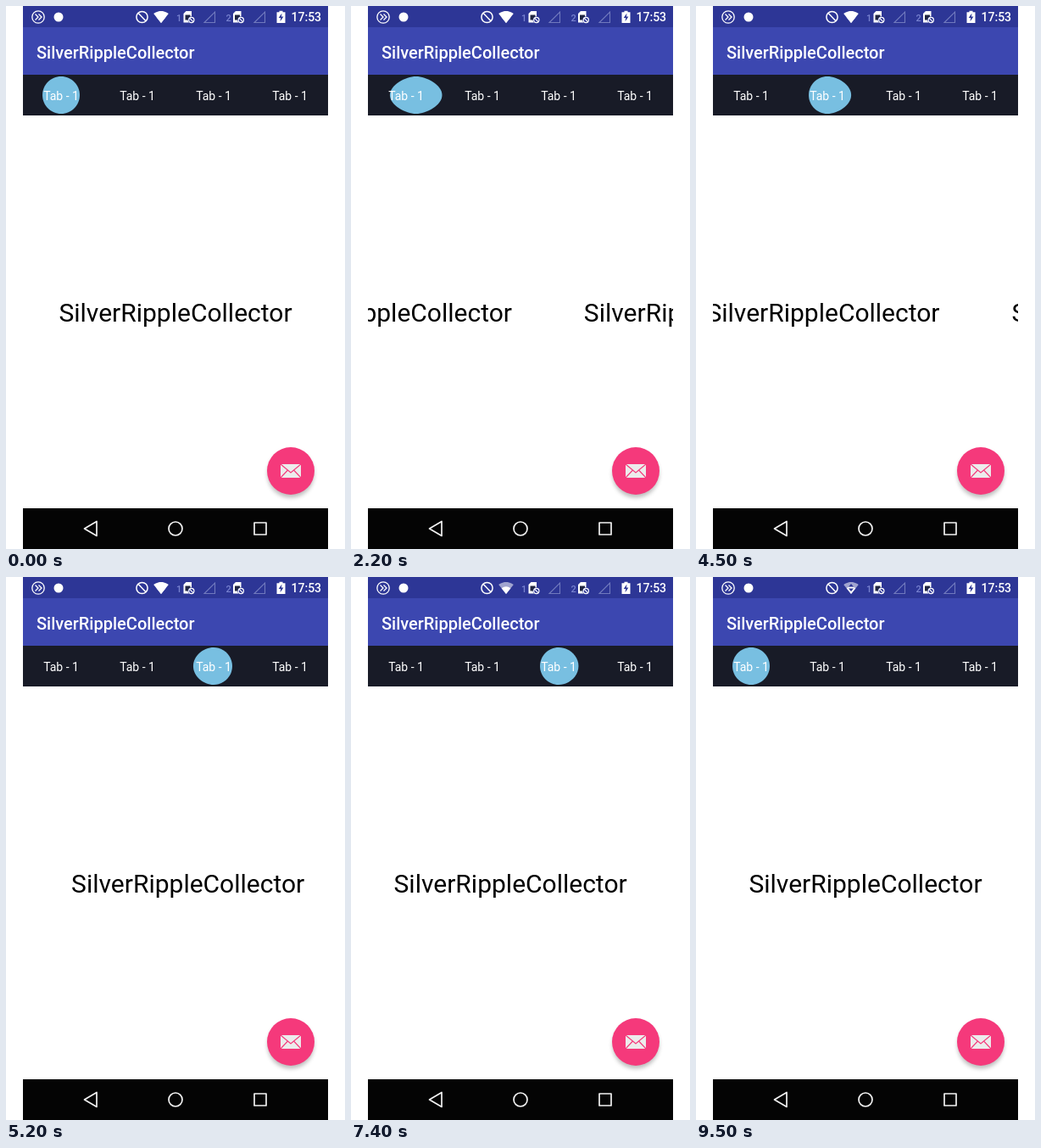
Animation of 400x640 px, one loop 10000 ms. Source, as an HTML page:

```html
<!DOCTYPE html>
<html lang="en">
<head>
<meta charset="utf-8">
<title>Tab indicator</title>
<style>
  html, body { margin: 0; width: 100%; height: 100%; overflow: hidden; background: #fff; }
  svg { display: block; width: 100%; height: 100%; font-family: Roboto, "Noto Sans", sans-serif; }
</style>
</head>
<body>
<svg viewBox="0 0 400 640">
  <defs>
    <clipPath id="screen"><rect x="20" y="0" width="360" height="640"/></clipPath>
    <filter id="soft" x="-30%" y="-30%" width="160%" height="160%"><feGaussianBlur stdDeviation="2.6"/></filter>
    <g id="sim">
      <path d="M0 3 L3 0 H9.5 V13.5 H0 Z" fill="#fff"/>
      <path d="M2 4.5 H8 V10.5 H2 Z" fill="#20253f"/>
      <circle cx="9.3" cy="10.5" r="4.2" fill="#2d3696"/>
      <circle cx="9.3" cy="10.5" r="3.1" fill="none" stroke="#fff" stroke-width="1.2"/>
      <path d="M7.2 8.4 L11.4 12.6" stroke="#fff" stroke-width="1.2"/>
    </g>
    <path id="signal" d="M0 12.5 L12.5 0 V12.5 Z" fill="none" stroke="#7079bd" stroke-width="1.1"/>
  </defs>
  <g clip-path="url(#screen)">
    <rect x="20" y="0" width="360" height="25" fill="#2d3696"/>
    <rect x="20" y="25" width="360" height="56" fill="#3c47b0"/>
    <rect x="20" y="81" width="360" height="48" fill="#181b27"/>
    <rect x="20" y="592" width="360" height="48" fill="#040404"/>

    <g fill="none" stroke="#fff" stroke-width="1.3">
      <circle cx="38" cy="13" r="7.2"/>
      <path d="M34.5 9.5 L38 13 L34.5 16.5 M38.5 9.5 L42 13 L38.5 16.5"/>
      <circle cx="160.5" cy="13" r="6.6" stroke-width="1.5"/>
      <path d="M156 8.3 L165 17.7" stroke-width="1.5"/>
    </g>
    <circle cx="62" cy="13" r="5.5" fill="#fff"/>
    <path id="wifi" d="M183 20 L191.8 9 C191.5 8.8 188.1 6 183 6 S174.5 8.8 174.2 9 Z" fill="#fff"/>
    <path d="M183 20 L188.4 13.2 Q183 9.4 177.6 13.2 Z" fill="#fff"/>
    <path id="arrows" d="M180 11.5 L183 8 L186 11.5 Z M180 13.5 H186 L183 17 Z" fill="#2d3696"/>
    <g font-size="11" font-weight="500" fill="#7983d0">
      <text x="201" y="18">1</text><text x="259.5" y="18">2</text>
    </g>
    <use href="#sim" x="209.5" y="6"/><use href="#sim" x="268" y="6"/>
    <use href="#signal" x="234" y="7"/><use href="#signal" x="293" y="7"/>
    <path d="M319.5 7.3 H322.5 V5.8 H326.5 V7.3 H329.5 V20 H319.5 Z" fill="#fff"/>
    <path d="M325.5 8.5 L321.7 14 H324.2 L323.5 18.3 L327.4 12.6 H324.9 Z" fill="#2d3696"/>
    <text x="336.5" y="18" font-size="14" font-weight="500" fill="#fff">17:53</text>

    <text x="36" y="61.5" font-size="20" font-weight="500" fill="#fff">SilverRippleCollector</text>
    <path id="blob" fill="#78bfe1"/>
    <g id="tabs" font-size="14" fill="#fff" text-anchor="middle"></g>
    <g id="pages" font-size="30" fill="#000" text-anchor="middle"></g>

    <circle cx="336" cy="552" r="27.5" fill="#000" opacity=".26" filter="url(#soft)"/>
    <circle cx="336" cy="548" r="28" fill="#f5397b"/>
    <rect x="324" y="540" width="24" height="16" fill="#ececec"/>
    <path d="M324 540 L336 550 L348 540 M324 556 L332.5 547 M348 556 L339.5 547" fill="none" stroke="#f5397b" stroke-width="1.1"/>

    <g fill="none" stroke="#f2f2f2" stroke-width="1.7" stroke-linejoin="round">
      <path d="M92.5 616 L107 607.5 V624.5 Z"/>
      <circle cx="200" cy="616" r="8"/>
      <rect x="293" y="609" width="14" height="14"/>
    </g>
  </g>
</svg>
<script>
  const LOOP = 10000, STEP = 100;
  const PAGE = 360, TAB = 90, FIRST = 65, CY = 105, R = 22;
  const STRETCH = 17.6, HANDLE = R * .5523;
  const $ = id => document.getElementById(id);
  const ramp = (x, a, b) => Math.min(1, Math.max(0, (x - a) / (b - a)));

  // [time in ms, page position]
  const swipes = [
    [0, 0], [1400, 0], [2000, .46], [2200, .41], [2600, .06], [3100, 0],
    [3200, 0], [3500, .314], [3800, .76], [4200, .985], [4350, 1],
    [4500, 1.139], [4800, 1.62], [5100, 1.93], [5400, 2],
    [5600, 2.06], [6000, 2.656], [6300, 2.95], [6550, 3],
    [6800, 2.88], [7000, 2.5], [7200, 2.14], [7400, 2.033], [7600, 2],
    [7700, 1.96], [8000, 1.5], [8300, 1.1], [8600, 1],
    [8700, .98], [9000, .55], [9300, .08], [9500, 0], [LOOP, 0]
  ];

  const slope = i => (swipes[i + 1][1] - swipes[i][1]) / (swipes[i + 1][0] - swipes[i][0]);

  // Harmonic mean of neighbouring slopes keeps the curve monotone
  function tangent(i) {
    if (i === 0 || i === swipes.length - 1) return 0;
    const a = slope(i - 1), b = slope(i);
    return a * b > 0 ? 2 * a * b / (a + b) : 0;
  }

  function position(t) {
    let i = 0;
    while (i < swipes.length - 2 && t >= swipes[i + 1][0]) i++;
    const [t0, p0] = swipes[i], [t1, p1] = swipes[i + 1];
    const d = t1 - t0, u = (t - t0) / d, v = 1 - u;
    return p0 * v * v * (1 + 2 * u) + p1 * u * u * (3 - 2 * u)
      + d * u * v * (tangent(i) * v - tangent(i + 1) * u);
  }

  // Front edge reaches out, the body jumps across, the rear edge follows
  function blobPath(pos) {
    const tab = Math.min(2, Math.floor(pos)), p = pos - tab;
    const shift = (TAB - STRETCH) * ramp(p, .4, .65);
    const base = FIRST + tab * TAB - R;
    const left = base + shift + STRETCH * ramp(p, .65, 1);
    const right = base + 2 * R + shift + STRETCH * ramp(p, 0, .4);
    const lean = (ramp(p, .2, .4) + ramp(p, .65, .85)) / 2;
    const mid = left + R + (right - left - 2 * R) * lean;
    const top = CY - R, bottom = CY + R, h = HANDLE;
    return `M${left} ${CY} C${left} ${CY - h} ${mid - h} ${top} ${mid} ${top}` +
      `C${mid + h} ${top} ${right} ${CY - h} ${right} ${CY}` +
      `C${right} ${CY + h} ${mid + h} ${bottom} ${mid} ${bottom}` +
      `C${mid - h} ${bottom} ${left} ${CY + h} ${left} ${CY}Z`;
  }

  function addText(parent, x, y, label) {
    const el = document.createElementNS("http://www.w3.org/2000/svg", "text");
    el.setAttribute("x", x);
    el.setAttribute("y", y);
    el.textContent = label;
    parent.append(el);
  }

  for (let i = 0; i < 4; i++) {
    addText($("tabs"), FIRST + i * TAB, 110.5, "Tab - 1");
    addText($("pages"), 200 + i * PAGE, 372, "SilverRippleCollector");
  }

  function draw(time) {
    const t = Math.floor(time % LOOP / STEP) * STEP;
    const pos = position(t);
    $("pages").setAttribute("transform", `translate(${-pos * PAGE} 0)`);
    $("blob").setAttribute("d", blobPath(pos));
    const busy = t >= 5600 && t < 6600 || t >= 9000;
    $("arrows").setAttribute("opacity", busy ? 1 : 0);
    $("wifi").setAttribute("opacity", t >= 7000 ? .55 : 1);
  }

  const start = performance.now();
  function tick() {
    draw(performance.now() - start);
    requestAnimationFrame(tick);
  }
  tick();
</script>
</body>
</html>
```
